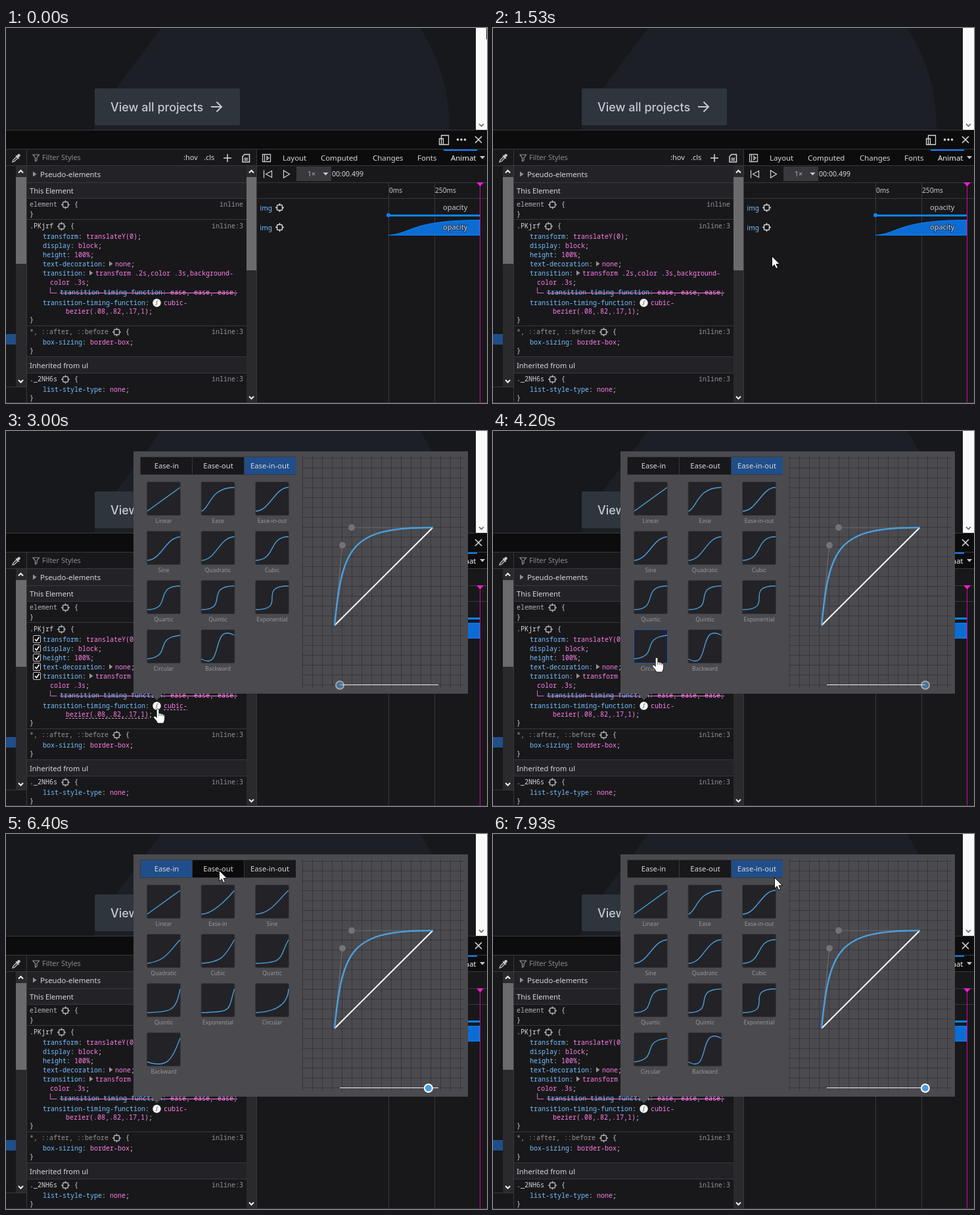
Write an HTML page that moves like this. It is 732x571 px and loops after 8 s.

```html
<!DOCTYPE html>
<html lang="en">
<head>
<meta charset="utf-8">
<title>Easing editor</title>
<style>
html, body { margin: 0; width: 100%; height: 100%; overflow: hidden; background: #18181a; }
svg { display: block; width: 732px; height: 571px; }
text { white-space: pre; font-family: "Noto Sans", sans-serif; }
.mono { font-family: "Noto Sans Mono", monospace; font-size: 10px; }
.ln { fill: none; stroke: #38383d; }
.ic { fill: none; stroke: #c8c8cc; stroke-width: 1.3; }
</style>
</head>
<body>
<svg id="stage" viewBox="0 0 732 571" xmlns="http://www.w3.org/2000/svg"></svg>
<script>
const BLUE = '#75bfff', PINK = '#ff7de9', GREY = '#939395', LIGHT = '#d7d7db', CURVE = '#4c9ed9';
const BOUNCE = [.08, .82, .17, 1];

const rect = (x, y, w, h, fill, more = '') =>
  `<rect x="${x}" y="${y}" width="${w}" height="${h}" fill="${fill}" ${more}/>`;
const path = (d, more = 'class="ic"') => `<path d="${d}" ${more}/>`;
const fill = (d, color) => path(d, `fill="${color}"`);
const label = (x, y, s, color = LIGHT, size = 11, more = '') =>
  `<text x="${x}" y="${y}" fill="${color}" font-size="${size}" ${more}>${s}</text>`;
const mono = (x, y, s, color = LIGHT, more = '') =>
  `<text class="mono" x="${x}" y="${y}" fill="${color}" ${more}>${s}</text>`;
const middle = 'text-anchor="middle"';
const prop = (y, name, value, x = 0) =>
  mono(56, y, `${name}<tspan fill="${LIGHT}">:</tspan> `, BLUE) + val(x || 56 + 6 * (name.length + 2), y, value);
const val = (x, y, s) =>
  mono(x, y, s.replace(/;$/, `<tspan fill="${LIGHT}">;</tspan>`), PINK);
const hline = (x1, x2, y) => path(`M${x1} ${y + .5}H${x2}`, 'class="ln"');
const vline = (x, y1, y2) => path(`M${x + .5} ${y1}V${y2}`, 'class="ln"');

function target(x, y, color = '#b1b1b3') {
  return rect(x - 3.5, y - 3.5, 8, 8, 'none', `rx="1.500" stroke="${color}" stroke-width="1.500"`) +
    path(`M${x + .5} ${y - 6}v3M${x + .5} ${y + 4}v3M${x - 6} ${y + .5}h3M${x + 4} ${y + .5}h3`,
      `stroke="${color}" stroke-width="1.500"`);
}

function scrollbar(x, end, thumbEnd) {
  return rect(x, 210, 16, end - 210, '#2a2a2d') + rect(x, 227, 16, thumbEnd - 227, '#6b6b6d') +
    path(`M${x + 4} 220.500l3.500-3.500 3.500 3.500M${x + 4} ${end - 10}l3.500 3.500 3.500-3.500`,
      'fill="none" stroke="#f0f0f2" stroke-width="2"');
}

function rule(y, name, iconX, braceX, from, color = LIGHT) {
  return mono(36, y, name, color) + target(iconX, y - 3.5) + mono(braceX, y, '{') +
    mono(361, y, from, GREY, 'text-anchor="end"');
}

function page() {
  return rect(0, 0, 732, 155, '#17181b') +
    fill('M236 0L180 75Q146 118 133 155H675C676 96 656 38 630 0Z', '#1d1f26') +
    rect(135, 92, 221, 56, '#2e353d', 'rx="2"') +
    `<text x="159" y="127" font-size="18" font-weight="500" fill="#c6c9d4" style="font-family:Inter,sans-serif">View all projects</text>` +
    path('M312 120h15M320.500 112.500l7.500 7.500-7.500 7.500', 'fill="none" stroke="#c6c9d4" stroke-width="2"') +
    rect(715, 0, 17, 155, '#fafafa') +
    path('M720 146l3.500 3.500 3.500-3.500', 'fill="none" stroke="#606060" stroke-width="1.600"');
}

function toolbars() {
  return rect(0, 155, 732, 55, '#0c0c0d') + rect(0, 185, 381, 25, '#18181a') +
    hline(0, 732, 155) + hline(0, 732, 184) + hline(0, 732, 209) +
    path('M662.500 163.500h11v14h-11zM659.500 168.500h6v9h-6z', 'fill="#0c0c0d" stroke="#d7d7db" stroke-width="1.300"') +
    [687.5, 693, 698.5].map(x => `<circle cx="${x}" cy="170" r="1.8" fill="${LIGHT}"/>`).join('') +
    path('M714 165l10 10M724 165l-10 10', 'fill="none" stroke="#d7d7db" stroke-width="1.600"') +
    path('M10 204l1-3 5-5 2 2-5 5zM15 194l5 5') + fill('M16 195l2.500-3q2-1 3 1t-.500 2.500l-2.500 2z', '#c8c8cc') +
    path('M41 193h9.500l-3.500 4.500v4l-2.500 1.500v-5.500z', 'fill="none" stroke="#939395" stroke-width="1.200"') +
    label(55, 201, 'Filter Styles', '#8a8a8e') + label(270, 201, ':hov') + label(301, 201, '.cls') +
    path('M331 198h12M337 192v12', 'fill="none" stroke="#d7d7db" stroke-width="1.500"') +
    path('M363 192.500h7.500v11.500h-10.500v-8.500zM362.500 198.500h5.500M362.500 201h5.500',
      'fill="none" stroke="#d7d7db" stroke-width="1.500"') +
    path('M390.500 192.500h12v11h-12zM393.500 193v10M397 195.500v5l3-2.500z') +
    rect(666, 185, 51, 2, '#0a84ff') +
    [[421, 'Layout'], [479, 'Computed'], [558, 'Changes'], [626, 'Fonts'], [677, 'Animat']]
      .map(([x, s]) => label(x, 202, s, x > 670 ? '#f4f4f6' : LIGHT, 11.4)).join('') +
    fill('M721 195h8l-4 4.500z', '#c8c8cc');
}

function rules() {
  return rect(0, 210, 381, 361, '#18181a') +
    rect(0, 466, 15, 16, '#204e8a') + hline(0, 32, 546) + vline(31, 185, 571) +
    scrollbar(15, 546, 359) + rect(32, 210, 334, 49, '#232327') + rect(32, 501, 334, 25, '#232327') +
    [235, 259, 291, 453, 500, 525].map(y => hline(32, 366, y)).join('') +
    scrollbar(366, 571, 369) + vline(381, 185, 571) +
    fill('M41 218.500v8l5.500-4z', GREY) + label(52, 227, 'Pseudo-elements', LIGHT, 11.3) +
    label(36, 252, 'This Element', LIGHT, 11.1) + label(36, 518, 'Inherited from ul', LIGHT, 11.1) +
    rule(272, 'element', 90, 104, 'inline', '#b1b1b3') + mono(36, 287, '}') +
    rule(305, '.PKjrf', 84, 98, 'inline:3') +
    prop(321, 'transform', 'translateY(0);') + prop(335, 'display', 'block;') + prop(349, 'height', '100%;') +
    prop(363, 'text-decoration', 'none;', 166) + fill('M157 355v8l5.500-4z', GREY) +
    prop(377, 'transition', 'transform .2s,color .3s,background-', 136) + fill('M127 369v8l5.500-4z', GREY) +
    val(67, 391, 'color .3s;') +
    path('M67.500 395v8.500h10', 'fill="none" stroke="#d967c7"') +
    mono(82, 406, `transition-timing-function: <tspan fill="${PINK}">ease, ease, ease;</tspan>`, BLUE) +
    path('M82 403.500H352', `fill="none" stroke="${PINK}"`) +
    prop(422, 'transition-timing-function', 'cubic-', 240) + val(91, 435, 'bezier(.08,.82,.17,1);') +
    `<circle cx="229.500" cy="418.500" r="6.200" fill="#f4f4f4"/>` +
    path('M227.500 422c4-1 0-6 4-7', 'fill="none" stroke="#555"') +
    mono(36, 448, '}') +
    rule(466, '*, ::after, ::before', 168, 182, 'inline:3', GREY) + prop(482, 'box-sizing', 'border-box;') + mono(36, 495, '}') +
    rule(538, '._2NH6s', 90, 104, 'inline:3') + prop(554, 'list-style-type', 'none;') + mono(36, 567, '}');
}

function animations() {
  return rect(382, 210, 350, 361, '#18181a') + hline(382, 732, 235) + hline(382, 732, 259) +
    path('M392.500 216.500v12M404.500 217.500v10l-9-5z') + path('M422.500 217v11l9-5.500z') +
    rect(442, 211, 53, 22, '#38383d') + label(459, 226, '1×', '#b1b1b3', 10.5) + fill('M482.500 220h8l-4 4.500z', '#c8c8cc') +
    label(496, 226, '00:00.499', LIGHT, 10.6) +
    vline(582, 236, 571) + vline(652, 236, 571) +
    label(583, 251, '0ms', '#c8c8cc', 10.2) + label(653, 251, '250ms', '#c8c8cc', 10.2) +
    [277, 307].map(y => label(386.5, y + 1, 'img', BLUE, 10.2) + target(416, y - 4, LIGHT)).join('') +
    rect(582, 284, 139, 3, '#0a84ff') + '<circle cx="582" cy="285" r="3" fill="#0a84ff"/>' +
    path(bezier([.25, .1, .25, 1], 582, 315.5, 139, 23) + 'V315.500Z', 'fill="#0b6dd3" stroke="#0a84ff"') +
    label(665, 277, 'opacity', '#c8c8cc') +
    label(665, 307, 'opacity', LIGHT, 11, 'stroke="#123a6b" stroke-width="2" paint-order="stroke"') +
    path('M721.500 240V571', 'stroke="#dd00a9"') + fill('M716 235h11l-5.500 6z', '#ff1ad9');
}

function bezier(b, x, y, w, h) {
  return `M${x} ${y}C${x + w * b[0]} ${y - h * b[1]} ${x + w * b[2]} ${y - h * b[3]} ${x + w} ${y - h}`;
}

const names = 'Sine Quadratic Cubic Quartic Quintic Exponential Circular Backward'.split(' ');
const easeIn = [[0, 0, 1, 1], [.42, 0, 1, 1], [.47, 0, .74, .71], [.55, .09, .68, .53], [.55, .06, .68, .19],
  [.9, .03, .69, .22], [.76, .05, .86, .06], [.95, .05, .8, .04], [.6, .04, .98, .34], [.6, -.28, .74, .05]];
const easeInOut = [[0, 0, 1, 1], [.25, .1, .25, 1], [.42, 0, .58, 1], [.45, .05, .55, .95], [.46, .03, .52, .96],
  [.65, .05, .36, 1], [.77, 0, .18, 1], [.86, 0, .07, 1], [1, 0, 0, 1], [.79, .14, .15, .86], [.68, -.55, .27, 1.55]];
const cell = i => [214 + (i % 3) * 82.5, 78 + Math.floor(i / 3) * 75];

function presets(id, titles, curves) {
  return `<g id="${id}">` + curves.map((b, i) => {
    const [x, y] = cell(i);
    return rect(x + .5, y - .5, 51, 51, '#232327', 'rx="2" stroke="#38383d"') +
      path(bezier(b, x + 1, y + 44, 50, 36), `fill="none" stroke="${CURVE}" stroke-width="1.400"`) +
      label(x + 26, y + 62, titles[i], '#98989c', 8.5, middle);
  }).join('') + '</g>';
}

function popup() {
  let grid = '';
  for (let x = 451.5; x < 697; x += 15) grid += `M${x} 38V391`;
  for (let y = 41.5; y < 391; y += 15) grid += `M451 ${y}H697`;
  const tabs = ['Ease-in', 'Ease-out', 'Ease-in-out'].map((s, i) =>
    rect(205 + i * 79, 40, 78, 26, '#18181a', `id="tab${i}"`) + label(244.5 + i * 78.5, 57, s, LIGHT, 11.2, middle)).join('');
  return '<g id="popup">' + rect(194, 31, 509, 369, '#4a4a4f') + fill('M221 400h17l-8.500 10z', '#4a4a4f') +
    rect(204, 39, 237, 28, '#38383d') + tabs +
    presets('inSet', ['Linear', 'Ease-in', ...names], easeIn) +
    presets('inOutSet', ['Linear', 'Ease', 'Ease-in-out', ...names], easeInOut) +
    rect(0, 0, 51, 51, 'none', 'id="hover" rx="2" stroke="#2058a8"') +
    path(grid, 'fill="none" stroke="#000" stroke-opacity=".24"') +
    path('M500 296L649.500 147', 'stroke="#fff" stroke-width="2"') +
    path('M500 296L512 174M649.500 147H526', 'stroke="#737377"') +
    path(bezier(BOUNCE, 500, 296, 149.5, 149), `fill="none" stroke="${CURVE}" stroke-width="2.500"`) +
    '<circle cx="512" cy="174" r="5" fill="#737377"/><circle cx="526" cy="147" r="5" fill="#737377"/>' +
    path('M508 386.500H658', 'stroke="#f0f0f0"') +
    `<circle id="knob" cy="387" r="6" fill="${CURVE}" stroke="#fff" stroke-width="2"/></g>`;
}

const check = (y, id = '') =>
  `<g ${id}>` + rect(41.5, y + .5, 11, 11, '#0c0c0d', 'rx="1.500" stroke="#c8c8cc"') +
  path(`M44 ${y + 6}l2.500 2.800 4-6`, 'fill="none" stroke="#fff" stroke-width="1.600"') + '</g>';

const cursors = '<g id="arrow">' +
  path('M.5 .5V17L4.200 13.500 6.800 19.300 9.500 18.100 7 12.500H12.300Z', 'fill="#fff" stroke="#000" stroke-width=".9"') +
  '</g><g id="hand">' +
  path('M-1.800 1.500Q-1.800 0 0 0T1.800 1.500V7Q4 6 5 7.700 7 7 8 8.800 10.500 8.500 10.500 11V15Q10.500 18 8.500 22H0Q-2 18-6.300 13.500-7 11.500-5 11.200-3.500 11-1.800 13.500Z',
    'fill="#fff" stroke="#111" stroke-width=".8"') +
  path('M1.800 7.500v3.500M5 8v3M8 9v2.500', 'fill="none" stroke="#222" stroke-width=".8"') + '</g>';

document.getElementById('stage').innerHTML = rect(0, 0, 732, 571, '#18181a') + page() + toolbars() + rules() + animations() +
  hline(0, 732, 570) +
  '<g id="checks">' + [311, 325, 339, 353, 367].map(y => check(y)).join('') + check(412, 'id="lastCheck"') + '</g>' +
  path('M240 424.500h36M91 437.500h126', 'id="dashes" fill="none" stroke="#c9a0c4" stroke-dasharray="3 2"') +
  popup() + cursors;

const $ = id => document.getElementById(id);
const show = (id, on) => $(id).setAttribute('display', on ? 'inline' : 'none');

// time, x, y of the pointer
const track = [[0, 731, 0], [1000, 731, 0], [1533, 424, 347], [1867, 287, 433], [1933, 285, 432], [2250, 250, 428],
  [2600, 231, 423], [3400, 231, 423], [3667, 283, 215], [3800, 286, 147], [4000, 270, 270], [4200, 249, 345],
  [4267, 249, 344], [4600, 272, 210], [5067, 271, 62], [5200, 270, 60], [5400, 270, 60], [5867, 263, 58],
  [6000, 264, 58], [6400, 324, 55], [6900, 392, 57], [7200, 402, 57], [7400, 404, 57], [7933, 428, 66], [8000, 428, 66]];

function pointer(t) {
  const i = Math.max(1, track.findIndex(p => p[0] >= t));
  const [a, b] = [track[i - 1], track[i]];
  const k = (t - a[0]) / (b[0] - a[0]);
  return [1, 2].map(n => Math.round(a[n] + (b[n] - a[n]) * k));
}

function ease(b, x) {
  let lo = 0, hi = 1, s = .5;
  const at = (p, q) => 3 * s * (1 - s) ** 2 * p + 3 * s * s * (1 - s) * q + s ** 3;
  for (let i = 0; i < 24; i++) {
    s = (lo + hi) / 2;
    if (at(b[0], b[2]) < x) lo = s; else hi = s;
  }
  return at(b[1], b[3]);
}

// rest left, glide right, rest right, glide back
function knobState(t) {
  const start = t >= 7000 ? 7000 : t >= 5800 ? 5797 : 3000;
  const p = ((t - start) % 2000) / 2000;
  if (p < .2) return [0, .5];
  if (p < .5) return [ease(BOUNCE, (p - .2) / .3), 1];
  if (p < .7) return [1, .5];
  return [1 - ease(BOUNCE, (p - .7) / .3), 1];
}

function draw(time) {
  let t = Math.floor(time * .015 + .08) / .015;
  if (t > 6010 && t < 6390) t = 6000;
  if (t > 7210 && t < 7390) t = 7200;
  const open = t > 2995, [x, y] = pointer(t);

  show('popup', open);
  show('checks', t > 1690 && t < 3460);
  show('lastCheck', !open);
  show('dashes', t > 1990 && t < 3460);

  const inMode = t > 6390 && t < 7390;
  show('inSet', inMode);
  show('inOutSet', !inMode);
  const picked = t > 5860 && t < 7190 ? 0 : 2;
  for (let i = 0; i < 3; i++) {
    const over = y >= 40 && y < 66 && x >= 205 + i * 79 && x < 284 + i * 79;
    $('tab' + i).setAttribute('fill', i === picked ? '#204e8a' : over ? '#0a0a0b' : '#18181a');
  }

  let hit = -1;
  if (open) for (let i = 0; i < (inMode ? 10 : 11); i++) {
    const [cx, cy] = cell(i);
    if (x >= cx && x < cx + 51 && y >= cy && y < cy + 51) hit = i;
  }
  show('hover', hit >= 0);
  if (hit >= 0) {
    const [cx, cy] = cell(hit);
    $('hover').setAttribute('transform', `translate(${cx + .5} ${cy - .5})`);
  }

  if (open) {
    const [k, alpha] = knobState(t);
    $('knob').setAttribute('cx', 508 + 150 * k);
    $('knob').setAttribute('opacity', alpha);
  }

  const onSwatch = t < 3460 && x < 236 && y > 410;
  const hand = onSwatch || hit >= 0;
  show('hand', hand);
  show('arrow', !hand);
  $(hand ? 'hand' : 'arrow').setAttribute('transform', `translate(${x} ${y})`);
}

let begin;
function tick(now) {
  begin ??= now;
  draw((now - begin) % 8000);
  requestAnimationFrame(tick);
}
draw(0);
requestAnimationFrame(tick);
</script>
</body>
</html>
```
